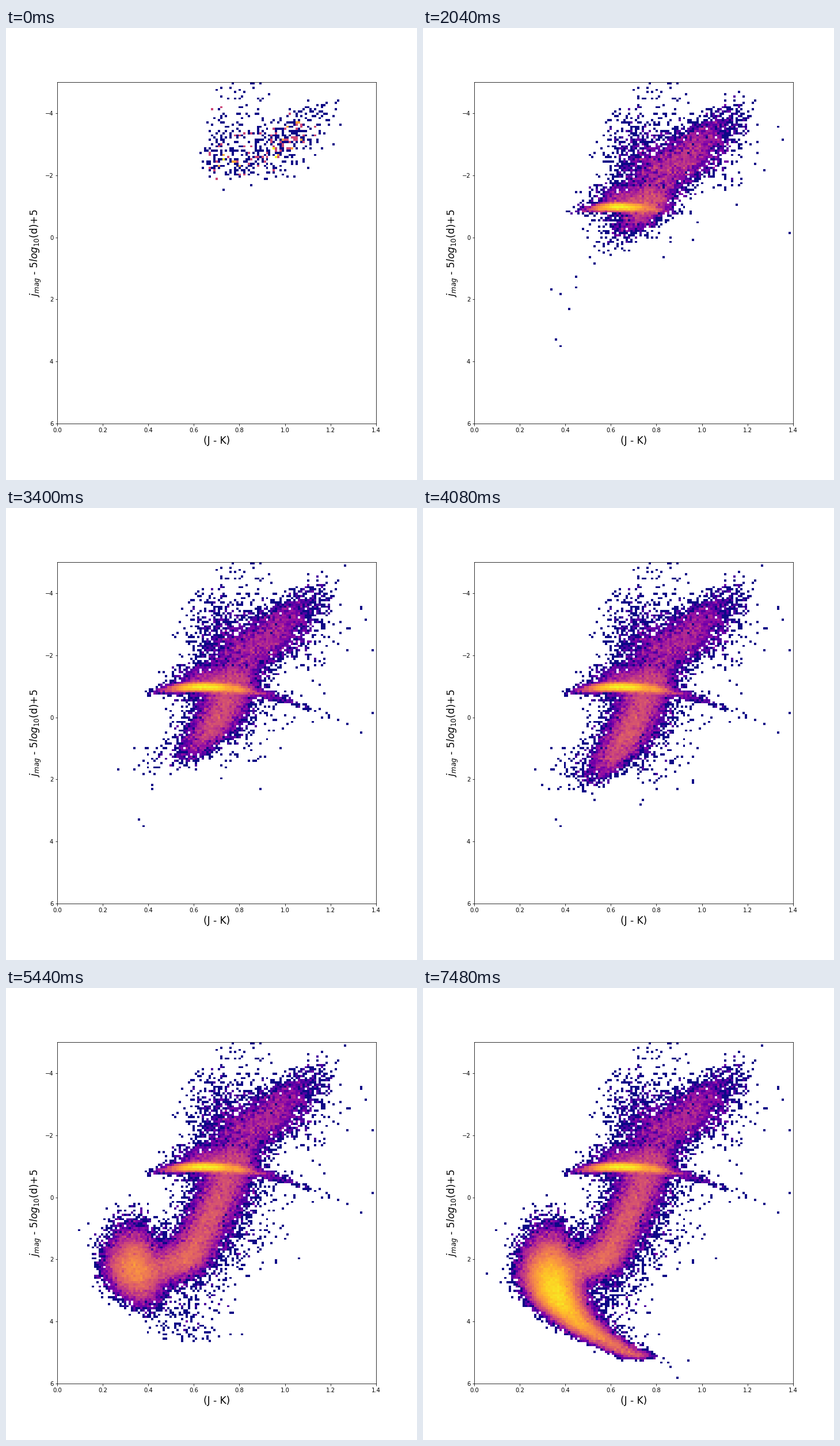
Animation of 714x785 px, one loop 7820 ms. Source, as a matplotlib script:

```python
import numpy as np
import matplotlib.pyplot as plt
from matplotlib.animation import FuncAnimation
from matplotlib.colors import LogNorm

FRAMES, INTERVAL = 23, 340
X_EDGES = np.linspace(0, 1.4, 140)
Y_EDGES = -5 + 0.07 * np.arange(158)

rng = np.random.default_rng(12)
normal, uniform, expo = rng.normal, rng.uniform, rng.exponential

# Each group returns colour, magnitude and the step at which a star appears.


def upper_giants():
    y = np.concatenate([normal(-2.75, .6, 2700), normal(-2.2, .28, 800)])
    width = .085 + .018 * np.minimum(y + 2.6, 0)
    x = .86 + .122 * (-2.1 - y) + np.maximum(width, .04) * normal(0, 1, y.size)
    t = 1.9 + 1.1 * (y + 2.7) + normal(0, 1.45, y.size)
    return x, y, t


def blue_wisps():
    n = 620
    x, y = normal(.72, .07, n), normal(-2.6, .65, n)
    late = 22 * np.maximum(.66 - x, 0) + 1.8 * np.maximum(y + 2.3, 0)
    return x, y, np.abs(normal(0, 2.2, n)) - .9 + late


def bright_scatter():
    n = 65
    return normal(.80, .07, n), uniform(-5, -3.2, n), uniform(-4, 1, n)


def red_scatter():
    n = 85
    return 1.08 + expo(.08, n), normal(-2.9, .8, n), uniform(-1, 8, n)


def clump_bar():
    x = np.concatenate([normal(.645, .073, 9000), .78 + expo(.08, 700)])
    y = -.98 + 3.1 * (x - .64) ** 2 + normal(0, .067, x.size)
    t = 5.7 + 7 * np.abs(x - .63) + normal(0, 1.1, x.size)
    return x, y, np.minimum(t, 9)


def clump_halo():
    n = 1700
    x, y = normal(.68, .075, n), normal(-1.15, .27, n)
    return x, y, 5 + 2 * (y + 1.2) + normal(0, 1.1, n)


def giant_branch():
    n = 12500
    y = -1.7 + 3.9 * uniform(0, 1, n) ** .75 + normal(0, .22, n)
    dx = normal(0, .048, n) * np.where(uniform(0, 1, n) < .13, 2, 1)
    t = 8 + 2.85 * y + 12 * dx + normal(0, 1.1, n)
    return .71 - .064 * y + dx, y, np.clip(t, 2, 16)


def subgiants():
    n = 4200
    u = uniform(0, 1, n)
    x, y = .58 - .2 * u, 1.9 + .65 * u
    t = 14.2 + u + normal(0, .8, n)
    return x + normal(0, .045, n), y + normal(0, .32, n), t


def red_field():
    n = 340
    y = normal(.6, 1.1, n)
    x = .77 - .03 * y + expo(.07, n)
    return x, y, 8.5 + 1.6 * y + normal(0, 1.5, n)


def faint_field():
    n = 480
    y = 2.2 + 2.4 * uniform(0, 1, n) ** 1.3
    return normal(.59, .07, n), y, uniform(13, 18.5, n)


def main_sequence():
    y = np.concatenate([normal(3, .75, 52000), uniform(4, 5.15, 3000)])
    y = y[y < 5.15]
    ridge = .33 + .0127 * np.maximum(y - 1.8, 0) ** 2.85
    width = .056 - .009 * np.maximum(y - 2.5, 0)
    x = ridge + width * normal(0, 1, y.size)
    t = 15.6 + 1.78 * (y - 2.1) + normal(0, 1.05, y.size)
    return x, y + normal(0, .05, y.size), np.clip(t, 12.5, 22)


def blue_strays():
    n = 14
    return normal(.40, .055, n), uniform(.9, 4.2, n), uniform(1, 12, n)


def late_strays():
    n = 6
    return uniform(.04, .28, n), uniform(-.5, 2.6, n), uniform(13, 18, n)


def faint_strays():
    n = 7
    y = uniform(4.3, 6, n)
    return normal(.83, .05, n), y, 17 + 2.8 * (y - 4.3)


groups = [upper_giants, blue_wisps, bright_scatter, red_scatter, clump_bar,
          clump_halo, giant_branch, subgiants, red_field, faint_field,
          main_sequence, blue_strays, late_strays, faint_strays]
color, mag, step = np.hstack([np.array(group()) for group in groups])


def density(frame):
    seen = step <= frame
    counts, _, _ = np.histogram2d(mag[seen], color[seen], [Y_EDGES, X_EDGES])
    return np.ma.masked_equal(counts, 0)


fig, ax = plt.subplots(figsize=(714 / 72, 785 / 72), dpi=72)
fig.subplots_adjust(left=.125, right=.9, bottom=.125, top=.88)
mesh = ax.pcolormesh(X_EDGES, Y_EDGES, density(0), cmap="plasma",
                     norm=LogNorm(1, 4))
ax.set_xlim(0, 1.4)
ax.set_ylim(6, -5)
ax.set_xlabel("(J - K)", fontsize=17)
ax.set_ylabel(r"$j_{mag}$ - 5$log_{10}$(d)+5", fontsize=17)


def update(frame):
    counts = density(frame)
    mesh.set_array(counts)
    mesh.set_clim(1, counts.max())
    return [mesh]


anim = FuncAnimation(fig, update, frames=FRAMES, interval=INTERVAL, repeat=True)
plt.show()
```
